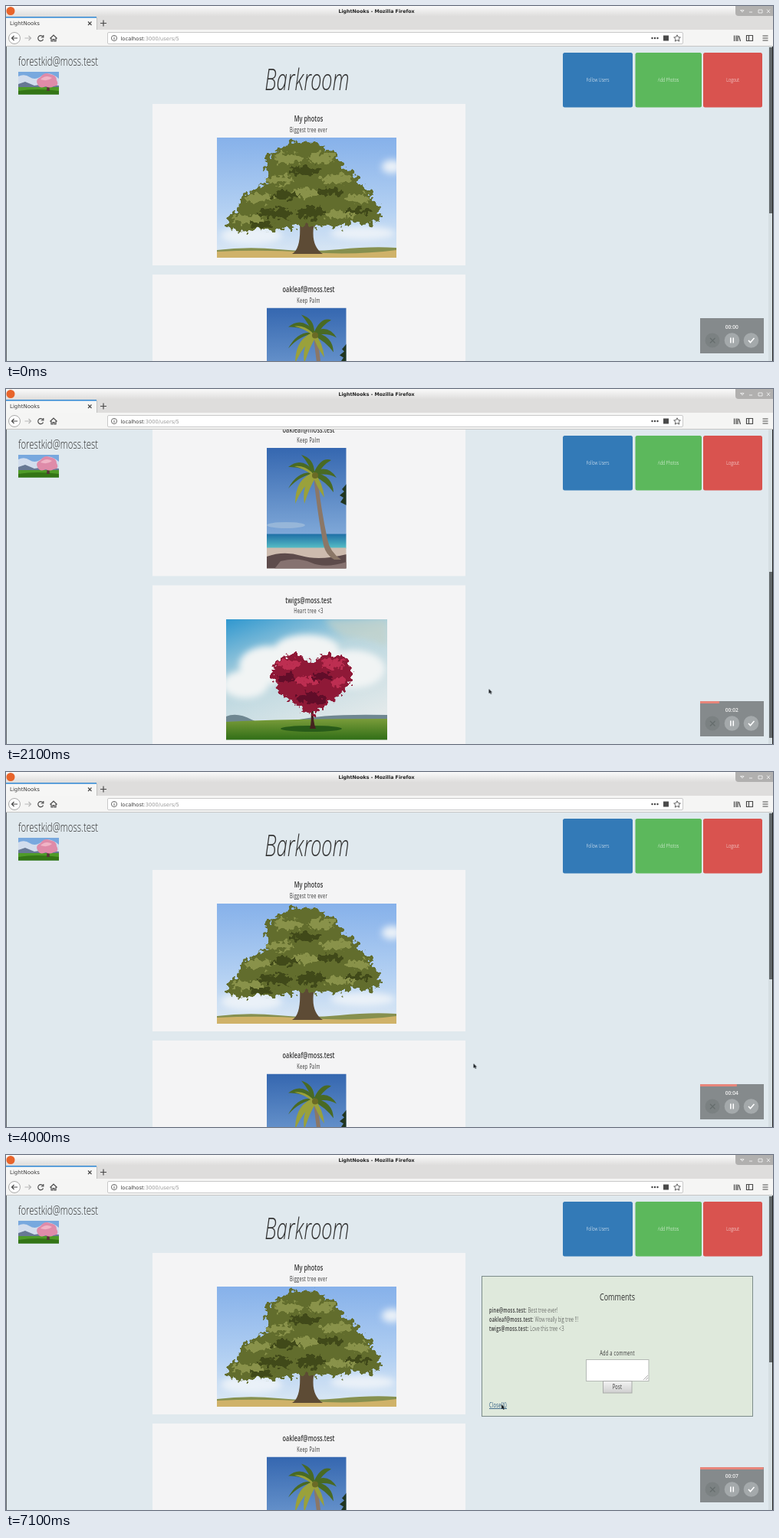
Recreate the animation shown at these times as an HTML page. Size 1000 by 464 pixels, loop 7200 ms.

```html
<!DOCTYPE html>
<html lang="en">
<head>
<meta charset="utf-8">
<title>Photo feed</title>
<style>
@property --scroll { syntax: '<number>'; inherits: true; initial-value: 0; }
html, body { margin: 0; width: 100%; height: 100%; overflow: hidden; background: #e0e9ee; }
#stage { display: block; width: 1000px; height: 464px; animation: scroll 7.2s infinite; }
text { white-space: pre; }

/* browser chrome */
.ui { font: 7px 'DejaVu Sans', sans-serif; fill: #3c3c3c; }
.icon { fill: none; stroke: #4a4a4a; stroke-width: 1.2; }

/* one condensed face for the whole page */
.n { font-family: 'Open Sans', sans-serif; fill: #333; transform: scaleX(.68); transform-box: fill-box; transform-origin: 0 0; }
.mid { text-anchor: middle; transform-origin: 50% 0; }
.light { font-weight: 300; }
.head { font-size: 10.8px; font-weight: 600; letter-spacing: .1px; }
.cap { font-size: 8.2px; font-weight: 500; letter-spacing: .5px; }
.user { font-size: 8.2px; font-weight: 600; letter-spacing: .45px; }
.say { font-size: 8.8px; font-weight: 300; }
.btn { font-size: 7.8px; font-weight: 300; fill: #fff; }
.clock { font: 600 6.7px 'Open Sans', sans-serif; fill: #f4f4f4; }

.feed { transform: translateY(calc(var(--scroll) * -1px)); }
.thumb { transform: translateY(calc(var(--scroll) * .5826px)); }
.bar { transform-box: fill-box; transform-origin: 0 0; animation: bar 7.2s infinite steps(69); }
.digits { animation: digits 7.2s infinite steps(7); }
.panel { animation: panel 7.2s infinite step-end; }
.close { animation: hover 7.2s infinite step-end; }
.cursor { animation: move 7.2s infinite, seen 7.2s infinite step-end; }

@keyframes scroll {
  0% { --scroll: 0; }
  12.5% { --scroll: 0; animation-timing-function: steps(6); }
  20.833% { --scroll: 155; animation-timing-function: steps(6); }
  29.166% { --scroll: 317.5; animation-timing-function: steps(2); }
  31.944% { --scroll: 333; }
  37.5% { --scroll: 333; animation-timing-function: steps(3); }
  41.666% { --scroll: 270.5; animation-timing-function: steps(7); }
  51.388%, 100% { --scroll: 0; }
}
@keyframes bar {
  0% { transform: scaleX(0); }
  95.833%, 100% { transform: scaleX(1); }
}
@keyframes digits {
  0% { transform: translateY(0); }
  97.222%, 100% { transform: translateY(-70px); }
}
@keyframes panel {
  0% { visibility: hidden; }
  65.277%, 100% { visibility: visible; }
}
@keyframes hover {
  0% { fill: #333; font-weight: 600; text-decoration: none; }
  90.277%, 100% { fill: #23527c; font-weight: 400; text-decoration: underline; }
}
@keyframes move {
  0%, 20.833% { transform: translate(630px, 386px); animation-timing-function: steps(6); }
  29.166% { transform: translate(629.5px, 392px); }
  37.5% { transform: translate(629.5px, 392px); animation-timing-function: steps(3); }
  41.666% { transform: translate(614.5px, 390.5px); animation-timing-function: steps(10); }
  55.555% { transform: translate(609.5px, 381px); animation-timing-function: steps(4); }
  61.111% { transform: translate(505px, 300px); }
  77.777% { transform: translate(505px, 300px); animation-timing-function: steps(9); }
  90.277%, 100% { transform: translate(646px, 326px); }
}
@keyframes seen {
  0% { visibility: hidden; }
  11.111% { visibility: visible; }
  65.277% { visibility: hidden; }
  77.777%, 100% { visibility: visible; }
}
</style>
</head>
<body>
<svg id="stage" viewBox="0 0 1000 464" xmlns="http://www.w3.org/2000/svg">
  <defs>
    <linearGradient id="title" x2="0" y2="1"><stop stop-color="#fafafa"/><stop offset="1" stop-color="#dddcdb"/></linearGradient>
    <linearGradient id="oakSky" x2="0" y2="1"><stop stop-color="#86b1ea"/><stop offset=".6" stop-color="#b3d0f2"/><stop offset="1" stop-color="#dde9f4"/></linearGradient>
    <linearGradient id="palmSky" x2="0" y2="1"><stop stop-color="#3567b0"/><stop offset="1" stop-color="#7fa8d8"/></linearGradient>
    <linearGradient id="sea" x2="0" y2="1"><stop stop-color="#1f6fa6"/><stop offset="1" stop-color="#58c0c6"/></linearGradient>
    <linearGradient id="heartSky" x2=".5" y2="1"><stop stop-color="#2f97cf"/><stop offset=".45" stop-color="#b9d6df"/><stop offset="1" stop-color="#e2e9ea"/></linearGradient>
    <linearGradient id="grass" x2="0" y2="1"><stop stop-color="#7a9c3a"/><stop offset="1" stop-color="#2f6d16"/></linearGradient>
    <linearGradient id="key" x2="0" y2="1"><stop stop-color="#f3f3f3"/><stop offset="1" stop-color="#cfcfcf"/></linearGradient>
    <filter id="leafy" x="-10%" y="-10%" width="120%" height="120%" color-interpolation-filters="sRGB">
      <feTurbulence type="fractalNoise" baseFrequency=".16" numOctaves="2" seed="4"/>
      <feDisplacementMap in="SourceGraphic" scale="17" xChannelSelector="R" yChannelSelector="G"/>
    </filter>
    <filter id="soft"><feGaussianBlur stdDeviation="4"/></filter>
    <clipPath id="view"><rect y="53" width="1000" height="411"/></clipPath>
  </defs>

  <rect width="1000" height="464" fill="#e0e9ee"/>

  <!-- scrolling feed -->
  <g clip-path="url(#view)">
    <g class="feed">
      <text class="n mid light" x="392.5" y="110" font-size="38" font-style="italic">Barkroom</text>
      <g fill="#f4f4f5">
        <rect x="191" y="128" width="408" height="211"/>
        <rect x="191" y="351" width="408" height="211"/>
        <rect x="191" y="574" width="408" height="211"/>
      </g>

      <text class="n mid head" x="394.5" y="151.5">My photos</text>
      <text class="n mid cap" x="394.5" y="165">Biggest tree ever</text>
      <svg x="275" y="172" width="234" height="157">
        <rect width="234" height="157" fill="url(#oakSky)"/>
        <g fill="#eaf1f8" filter="url(#soft)">
          <ellipse cx="228" cy="38" rx="13" ry="9"/><ellipse cx="45" cy="128" rx="40" ry="12"/><ellipse cx="190" cy="125" rx="42" ry="9"/>
        </g>
        <path d="M0 147Q40 142 80 146T160 146T234 144V157H0Z" fill="#86904f"/>
        <path d="M0 149Q60 146 120 150T234 147V157H0Z" fill="#cfb269"/>
        <path d="M98 152Q110 145 108 112L88 98 92 94 112 106 116 80H122L122 108 146 92 149 96 126 117Q123 142 138 152Z" fill="#5d4b35"/>
        <g filter="url(#leafy)">
          <path d="M63 34Q64 18 82 18Q88 4 108 7Q130 2 142 15Q160 18 163 37Q182 42 184 60Q204 68 202 82Q218 92 211 106Q200 119 178 110Q160 124 142 113Q128 122 118 111Q100 120 88 118Q72 127 55 118Q30 130 14 116Q8 102 28 96Q24 78 44 70Q58 62 70 56Q60 46 63 34Z" fill="#626d2d"/>
          <g fill="#89924a">
            <ellipse cx="92" cy="27" rx="18" ry="7"/><ellipse cx="136" cy="27" rx="17" ry="7"/><ellipse cx="82" cy="55" rx="18" ry="6"/><ellipse cx="156" cy="54" rx="21" ry="6"/><ellipse cx="55" cy="79" rx="19" ry="6"/><ellipse cx="116" cy="72" rx="18" ry="6"/><ellipse cx="183" cy="80" rx="16" ry="6"/><ellipse cx="40" cy="106" rx="20" ry="5"/><ellipse cx="160" cy="101" rx="22" ry="5"/>
          </g>
          <g fill="#404919">
            <ellipse cx="116" cy="43" rx="20" ry="6"/><ellipse cx="148" cy="71" rx="17" ry="5"/><ellipse cx="88" cy="75" rx="16" ry="6"/><ellipse cx="77" cy="99" rx="22" ry="7"/><ellipse cx="122" cy="98" rx="18" ry="8"/><ellipse cx="184" cy="96" rx="17" ry="4"/><ellipse cx="58" cy="113" rx="16" ry="4"/>
          </g>
        </g>
      </svg>

      <text class="n mid head" x="394.5" y="374.5">oakleaf@moss.test</text>
      <text class="n mid cap" x="394.5" y="388">Keep Palm</text>
      <svg x="340" y="394.5" width="103.5" height="157.5">
        <rect width="104" height="113" fill="url(#palmSky)"/>
        <ellipse cx="25" cy="101" rx="25" ry="4" fill="#a4bfdc" opacity=".7"/>
        <rect y="112.5" width="104" height="19" fill="url(#sea)"/>
        <rect y="130.5" width="104" height="27" fill="#cdbbae"/>
        <path d="M0 142Q22 134 45 141T104 139V158H0Z" fill="#5d4b4b"/>
        <path d="M18 148Q40 142 58 150T104 149V158H10Z" fill="#867270"/>
        <path d="M61 38Q67 92 74 127Q77 140 88 146H97Q82 136 79 119Q71 82 66 38Z" fill="#8b7767"/>
        <g fill="#496a24">
          <path d="M63 33Q41 28 28 53Q43 36 63 33Z"/>
          <path d="M63 32Q46 10 28 25Q46 24 63 35Z"/>
          <path d="M62 32Q62 14 45 9Q55 20 60 36Z"/>
          <path d="M61 33Q71 11 84 16Q73 22 65 36Z"/>
          <path d="M62 31Q80 21 91 39Q78 32 63 36Z"/>
          <path d="M62 32Q86 36 87 58Q77 44 62 37Z"/>
        </g>
        <g fill="#9aa13b">
          <path d="M62 32Q37 39 37 73Q46 50 64 37Z"/>
          <path d="M61 33Q45 48 49 73Q55 53 65 36Z"/>
          <path d="M62 33Q73 45 75 65Q65 51 60 36Z"/>
          <path d="M59 32Q48 22 36 24Q48 27 59 35Z"/>
        </g>
        <circle cx="63" cy="36" r="4" fill="#6b6b25"/>
        <path d="M104 47L98 54 101 57 95 62 100 65 96 71 104 75Z" fill="#20351f"/>
      </svg>

      <text class="n mid head" x="394.5" y="597.5">twigs@moss.test</text>
      <text class="n mid cap" x="394.5" y="611">Heart tree &lt;3</text>
      <svg x="287" y="618.5" width="210" height="157.5">
        <rect width="210" height="158" fill="url(#heartSky)"/>
        <g fill="#f1f4f4" filter="url(#soft)">
          <ellipse cx="55" cy="60" rx="38" ry="25"/><ellipse cx="105" cy="39" rx="42" ry="19"/><ellipse cx="165" cy="65" rx="42" ry="25"/><ellipse cx="25" cy="85" rx="30" ry="18"/>
        </g>
        <path d="M128 0H210V36Q184 24 165 24T128 0Z" fill="#c3d2c9" opacity=".7" filter="url(#soft)"/>
        <path d="M0 127Q14 121 33 131T90 132T210 125V140H0Z" fill="#6f8791"/>
        <path d="M0 134Q80 130 210 130V158H0Z" fill="url(#grass)"/>
        <ellipse cx="111" cy="143" rx="40" ry="4" fill="#285b19"/>
        <path d="M109 143Q112 134 110 115H114Q113 135 117 143Z" fill="#44221f"/>
        <g filter="url(#leafy)">
          <path d="M111 59Q98 42 80 47Q58 53 60 75Q65 97 91 112L112 126 133 111Q160 95 166 73Q163 49 142 46Q122 44 111 59Z" fill="#8f1937"/>
          <g fill="#bd2e51">
            <ellipse cx="82" cy="58" rx="15" ry="6"/><ellipse cx="139" cy="58" rx="15" ry="6"/><ellipse cx="104" cy="80" rx="15" ry="5"/><ellipse cx="146" cy="82" rx="9" ry="5"/>
          </g>
          <g fill="#610d29">
            <ellipse cx="79" cy="77" rx="11" ry="6"/><ellipse cx="126" cy="75" rx="13" ry="5"/><ellipse cx="111" cy="103" rx="19" ry="7"/>
          </g>
        </g>
      </svg>
    </g>
  </g>

  <!-- fixed page parts -->
  <text class="n light" x="16" y="78" font-size="16.8">forestkid@moss.test</text>
  <svg x="16" y="86" width="53" height="29.5">
    <rect width="53" height="30" fill="#78a8de"/>
    <path d="M0 6Q8 2 15 7T31 5 53 9V19H0Z" fill="#d2dded"/>
    <path d="M0 16L9 13 21 18 34 16 53 18V23H0Z" fill="#677894"/>
    <rect y="20" width="53" height="10" fill="#4f9b28"/>
    <path d="M0 25Q24 21 53 25V30H0Z" fill="#347516"/>
    <path d="M37 25L38 15H40L41 25Z" fill="#573338"/>
    <path d="M25 16Q22 10 29 7Q34 0 41 3Q50 4 50 11Q54 18 46 19Q41 22 36 19Q28 23 25 16Z" fill="#df8ba9"/>
    <path d="M29 10Q36 3 44 8Q38 13 29 10Z" fill="#f0b4c6"/>
  </svg>
  <rect x="726" y="61" width="91" height="71.5" rx="2.5" fill="#337ab7"/>
  <rect x="820.5" y="61" width="86.5" height="71.5" rx="2.5" fill="#5cb85c"/>
  <rect x="909" y="61" width="77" height="71.5" rx="2.5" fill="#d9534f"/>
  <text class="n mid btn" x="771.5" y="99.5">Follow Users</text>
  <text class="n mid btn" x="863.5" y="99.5">Add Photos</text>
  <text class="n mid btn" x="947.5" y="99.5">Logout</text>

  <g class="panel">
    <rect x="620.5" y="158.5" width="353" height="183" fill="#dfe9dc" stroke="#7c8b8a"/>
    <text class="n mid" x="797" y="190" font-size="13.3" font-weight="500">Comments</text>
    <text class="n user" x="630" y="206">pine@moss.test: <tspan class="say" letter-spacing="0">Best tree ever!</tspan></text>
    <text class="n user" x="630" y="218">oakleaf@moss.test: <tspan class="say" letter-spacing="0">Wow really big tree !!!</tspan></text>
    <text class="n user" x="630" y="230">twigs@moss.test: <tspan class="say" letter-spacing="0">Love this tree &lt;3</tspan></text>
    <text class="n mid cap" x="797" y="262">Add a comment</text>
    <rect x="756.5" y="267.5" width="81.5" height="28" fill="#fff" stroke="#b5b9b5"/>
    <path d="M831 294L837 288M834 294L837 291" stroke="#888" stroke-width=".7"/>
    <rect x="778.5" y="295.5" width="37.5" height="15.5" fill="url(#key)" stroke="#a9aba9"/>
    <text class="n mid cap" x="797" y="306.5">Post</text>
    <text class="n user close" x="630" y="330">Close(X)</text>
  </g>

  <!-- scrollbar and window edges -->
  <rect x="994" y="53" width="6" height="411" fill="#d5dee2"/>
  <rect class="thumb" x="995" y="54" width="4" height="217" fill="#62686b"/>
  <rect x="999" y="53" width="1" height="411" fill="#222"/>
  <rect y="53" width="1" height="411" fill="#63696c"/>

  <!-- window chrome -->
  <rect width="1000" height="14" fill="url(#title)"/>
  <circle cx="6" cy="6.5" r="5.5" fill="#e8642a"/>
  <text class="ui" x="483" y="9" text-anchor="middle" style="font-size:6.3px;font-weight:700;fill:#222">LightNooks - Mozilla Firefox</text>
  <path d="M951 0H1000V13H955Q951 13 951 9Z" fill="#b1b0af"/>
  <path d="M957.500 5.500H962L960 8ZM969 8H973M981 5H986V9H981ZM992 4.500L996 9M996 4.500L992 9" fill="none" stroke="#e9e9e9"/>
  <rect y="14" width="1000" height="17" fill="#dedddc"/>
  <rect y="14" width="118" height="17" fill="#f6f6f5"/>
  <rect y="14" width="118" height="1.500" fill="#2e87d3"/>
  <path d="M118.500 15V31" stroke="#c2c1c0"/>
  <text class="ui" x="5" y="25">LightNooks</text>
  <path class="icon" d="M107 20.500L111.500 25M111.500 20.500L107 25M123 22.500H131M127 18.500V26.500"/>
  <rect y="31" width="1000" height="22" fill="#f5f5f4"/>
  <path d="M0 52.500H1000" stroke="#c6c6c5"/>
  <circle cx="11" cy="42" r="7.500" fill="#fdfdfd" stroke="#aaa"/>
  <path class="icon" d="M15 42H7.500M10.500 39L7.500 42 10.500 45"/>
  <path class="icon" style="stroke:#b5b5b5" d="M24.500 42H32.500M29.500 39L32.500 42 29.500 45"/>
  <path class="icon" d="M48 40A3.500 3.500 0 1 0 48.500 43.500M48.800 38V41H45.800M57.500 42.500L62 38 66.500 42.500M59 42V46H61V43.500H63V46H65V42"/>
  <rect x="132.500" y="34.500" width="750" height="15" rx="1.500" fill="#fff" stroke="#c9c9c9"/>
  <circle class="icon" cx="141" cy="42" r="3.600" style="stroke-width:.8"/>
  <path class="icon" d="M141 41.500V44M141 39.800V40.600" style="stroke-width:.9"/>
  <text class="ui" x="149.500" y="44.500" style="font-size:6.700px">localhost<tspan fill="#999">:3000/users/5</tspan></text>
  <g fill="#444"><circle cx="842.500" cy="42" r="1.200"/><circle cx="846" cy="42" r="1.200"/><circle cx="849.500" cy="42" r="1.200"/></g>
  <rect x="857" y="38.500" width="7" height="7" fill="#4a4a4a"/>
  <path class="icon" style="stroke-width:.9" d="M875 37.800L876.300 40.600 879.300 41 877.100 43.100 877.700 46.100 875 44.600 872.300 46.100 872.900 43.100 870.700 41 873.700 40.600Z"/>
  <path class="icon" d="M949.500 38.500V46M952 38.500V46M954 38.500V46M955.500 39L957.500 46M965.500 38.500H973.500V45.500H965.500ZM968.500 38.500V45.500M986.500 39H993.500M986.500 42H993.500M986.500 45H993.500"/>

  <!-- recorder -->
  <rect x="905" y="408" width="83" height="46" fill="#858a8c"/>
  <rect class="bar" x="905" y="408" width="82.500" height="3" fill="#e7857a"/>
  <circle cx="921" cy="437" r="9.500" fill="#7b8182"/>
  <circle cx="946.500" cy="437" r="9.800" fill="#a4a9ab"/>
  <circle cx="971.500" cy="437" r="9.800" fill="#a4a9ab"/>
  <path d="M918 434L924.500 440.500M924.500 434L918 440.500" stroke="#666d6d" stroke-width="1.300"/>
  <path d="M944.800 433.500V440.500M948.300 433.500V440.500M968 437L970.500 439.800 975.500 434" fill="none" stroke="#fff" stroke-width="1.500"/>
  <text class="clock" x="951" y="422" text-anchor="end">00:0</text>
  <svg x="951" y="414" width="6" height="10">
    <text class="clock digits" y="8">0<tspan x="0" dy="10">1</tspan><tspan x="0" dy="10">2</tspan><tspan x="0" dy="10">3</tspan><tspan x="0" dy="10">4</tspan><tspan x="0" dy="10">5</tspan><tspan x="0" dy="10">6</tspan><tspan x="0" dy="10">7</tspan></text>
  </svg>

  <path class="cursor" d="M0 0V6L1.500 4.800 2.500 7 3.600 6.500 2.600 4.400H4.400Z" fill="#1d2226"/>
</svg>
</body>
</html>
```
